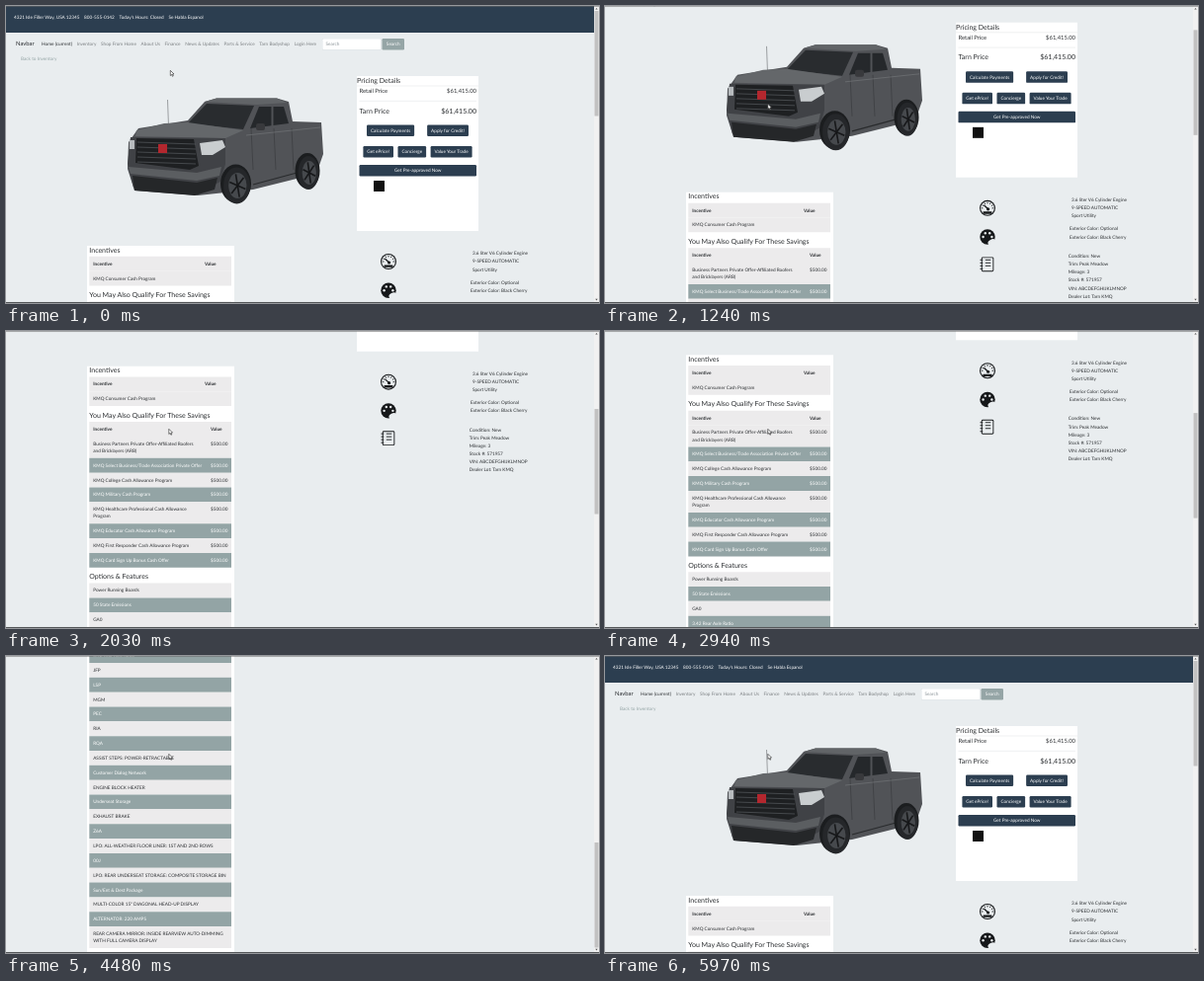
These frames come from a looping animation (600 px wide and 301 px high, 6 s). An HTML page with a canvas:

```html
<!DOCTYPE html>
<html lang="en">
<head>
<meta charset="utf-8">
<title>Vehicle page scroll</title>
<style>
html, body { margin: 0; width: 100%; height: 100%; overflow: hidden; background: #e9edef; }
canvas { display: block; width: 600px; height: 301px; }
</style>
</head>
<body>
<canvas id="stage" width="600" height="301"></canvas>
<script>
const ctx = document.getElementById('stage').getContext('2d');
ctx.textRendering = 'geometricPrecision';

const LOOP = 6000, W = 600, H = 301;
const NOTCH = 31.25, END = 515.3;
const BG = '#e9edef', NAVY = '#2c3e50', SLATE = '#93a4a5', INK = '#2b2e31', PALE = '#ecebec', DARK = '#16181a';
const BODY = 4.69, H5 = 5.86, H4 = 7.03, ROW = 14.84, LEADING = 7.1;

// Wheel travel: [time, notches scrolled]
const SCROLL = [
  [0, 0], [400, 0], [610, 1], [970, 1], [1240, 1.73], [1760, 4], [2120, 7], [2940, 7],
  [3270, 12], [3480, 12], [3700, END / NOTCH], [4480, END / NOTCH], [4730, 12], [4880, 12],
  [5150, 2.48], [5480, 0], [LOOP, 0]
];

// Monotone cubic interpolation keeps the holds flat and the moves smooth.
function sample(keys, t) {
  const rate = i => (keys[i + 1][1] - keys[i][1]) / (keys[i + 1][0] - keys[i][0]);
  const tangent = i => {
    if (i === 0 || i === keys.length - 1) return 0;
    const a = rate(i - 1), b = rate(i);
    return a * b <= 0 ? 0 : 2 * a * b / (a + b);
  };
  let i = 0;
  while (i < keys.length - 2 && t >= keys[i + 1][0]) i++;
  const [t0, v0] = keys[i], [t1, v1] = keys[i + 1];
  const d = t1 - t0, u = (t - t0) / d, w = 1 - u;
  return v0 * (1 + 2 * u) * w * w + v1 * u * u * (3 - 2 * u)
    + d * (tangent(i) * u * w * w - tangent(i + 1) * u * u * w);
}

function textWidth(str, size = BODY, weight = 400) {
  ctx.font = `${weight} ${size}px Lato, sans-serif`;
  return ctx.measureText(str).width;
}

function text(str, x, y, size = BODY, color = INK, weight = 400, align = 'left') {
  const width = textWidth(str, size, weight);
  ctx.fillStyle = color;
  ctx.textAlign = align;
  ctx.fillText(str, x, y + size * 0.35);
  return x + width;
}

function textFlow(items, x, y, color) {
  for (const item of items) x = text(item, x, y, BODY, color) + BODY;
}

function textStack(items, x, y, leading, color, weight) {
  items.forEach((item, i) => text(item, x, y + i * leading, BODY, color, weight));
}

function rect(x, y, w, h, color, radius = 0) {
  ctx.fillStyle = color;
  ctx.beginPath();
  ctx.roundRect(x, y, w, h, radius);
  ctx.fill();
}

function trace(points) {
  ctx.beginPath();
  for (let i = 0; i < points.length; i += 2) ctx.lineTo(points[i], points[i + 1]);
}

function poly(color, ...points) {
  ctx.fillStyle = color;
  trace(points);
  ctx.fill();
}

function line(color, width, ...points) {
  ctx.strokeStyle = color;
  ctx.lineWidth = width;
  trace(points);
  ctx.stroke();
}

function oval(x, y, rx, ry, color, tilt = 0) {
  ctx.fillStyle = color;
  ctx.beginPath();
  ctx.ellipse(x, y, rx, ry, tilt, 0, 7);
  ctx.fill();
}

function button(label, x, y, w, color = NAVY) {
  rect(x, y, w, 11.5, color, 1.2);
  text(label, x + w / 2, y + 5.7, BODY, '#fff', 400, 'center');
}

function buttonRow(labels, y, gap) {
  const widths = labels.map(label => textWidth(label) + 7.9);
  let x = 416.5 - (widths.reduce((a, b) => a + b) + gap * (labels.length - 1)) / 2;
  labels.forEach((label, i) => {
    button(label, x, y, widths[i]);
    x += widths[i] + gap;
  });
}

function header() {
  rect(0, 0, W, 27, NAVY);
  textFlow(['4321 Isle Filler Way, USA 12345', '800-555-0142', "Today's Hours: Closed", 'Se Habla Espanol'],
    8, 11.5, '#fff');
  text('Navbar', 10, 38.3, H5);
  const next = text('Home (current)', 36, 38.3) + BODY;
  textFlow(['Inventory', 'Shop From Home', 'About Us', 'Finance', 'News & Updates', 'Parts & Service',
    'Tarn Bodyshop', 'Login Here'], next, 38.3, '#7b7f82');
  rect(320, 33, 59.5, 11.5, '#ced4da', 1.2);
  rect(320.3, 33.3, 58.9, 10.9, '#fff', 1);
  text('Search', 323.5, 38.5, BODY, '#8b9499');
  button('Search', 380.5, 33, 22.5, '#95a5a6');
  text('Back to Inventory', 15, 53, BODY, '#95a5a6');
}

function wheel(x, y, rx, ry) {
  oval(x - 1, y - 2, rx + 2, ry + 1, '#1b1d1f');
  oval(x, y, rx, ry, '#25272a');
  oval(x + 0.8, y, rx * 0.68, ry * 0.7, '#46494d');
  for (let i = 0; i < 6; i++) {
    const a = i * Math.PI / 3 + 0.3;
    line('#17181a', 1.6, x + 0.8, y, x + 0.8 + Math.cos(a) * rx * 0.62, y + Math.sin(a) * ry * 0.64);
  }
}

function truck() {
  line('#66696c', 0.6, 163.5, 95, 164.5, 122);
  // silhouette, roof and glass
  poly('#515357', 124, 138, 134, 124, 184, 116, 201, 97, 213, 93.5, 274, 93.5, 286, 97, 290, 117, 319, 118,
    321, 150, 314, 170, 250, 186, 194, 192, 130, 187, 123, 165);
  poly('#616467', 201, 97, 213, 93.5, 274, 93.5, 284, 98, 254, 100);
  poly('#292c2f', 184, 119, 203, 99, 251, 101, 240, 125);
  poly('#25282b', 247, 124, 256, 102, 281, 102, 286, 119);
  rect(268.5, 101, 2, 22, '#515357');
  rect(253, 119, 9, 7, '#38393c', 2);
  for (const x of [248, 271, 289]) line('#36383b', 0.6, x, 124, x + 2, 166);
  line('#717478', 0.7, 243, 131, 318, 123);
  line('#292b2d', 1.2, 250, 181, 298, 168);
  // bonnet, grille and lamps
  poly('#64676a', 132, 126, 160, 119, 184, 118, 240, 126, 222, 134, 131, 132);
  poly('#404246', 126, 133, 222, 134, 222, 160, 217, 178, 193, 190, 129, 184, 123, 160);
  poly('#1e2022', 132, 134, 190, 135, 195, 162, 186, 166, 131, 159);
  for (let y = 138; y < 162; y += 5) line('#505357', 0.8, 133, y, 192, y + 2);
  poly('#c9cdcf', 196, 139, 219, 136, 222, 143, 209, 151, 198, 151);
  rect(125, 136, 5, 9, '#b7bbbe');
  rect(154, 140, 9, 9, '#b3272e');
  poly('#5b5e61', 124, 163, 193, 169, 218, 163, 216, 172, 193, 177, 126, 170);
  poly('#252729', 128, 172, 193, 179, 214, 174, 211, 186, 191, 192, 130, 187);
  wheel(306, 169, 10.5, 17);
  wheel(233.5, 182, 13.5, 18.5);
}

function pricing() {
  rect(355, 71, 123, 157, '#fff');
  text('Pricing Details', 355, 75.7, H4);
  line('#e4e6e8', 0.6, 355, 81, 478, 81);
  line('#e4e6e8', 0.6, 357.5, 96.3, 476, 96.3);
  [['Retail Price', 85.8, H5], ['Tarn Price', 106.2, H4]].forEach(([label, y, size]) => {
    text(label, 357.5, y, size);
    text('$61,415.00', 476, y, size, INK, 400, 'right');
  });
  buttonRow(['Calculate Payments', 'Apply for Credit!'], 120.5, 13);
  buttonRow(['Get ePrice!', 'Concierge', 'Value Your Trade'], 142, 4.5);
  button('Get Pre-approved Now', 357.5, 161, 118.5);
  rect(372, 177, 11, 11, '#111');
}

function tableRow(y, label, value, dark, weight, valueX = 207) {
  const lines = label.split('|'), h = ROW + (lines.length - 1) * LEADING;
  const color = dark ? '#fff' : INK;
  rect(84.3, y, 143.7, h, dark ? SLATE : PALE);
  textStack(lines, 88.2, y + 7.3, LEADING, color, weight);
  if (value) text(value, valueX, y + 7.3, BODY, color, weight);
  return y + h;
}

function stripedRows(y, labels, value) {
  labels.forEach((label, i) => { y = tableRow(y, label, value, i % 2 === 1); });
}

const OFFERS = [
  'Business Partners Private Offer-Affiliated Roofers|and Bricklayers (ARB)',
  'KMQ Select Business/Trade Association Private Offer', 'KMQ College Cash Allowance Program',
  'KMQ Military Cash Program', 'KMQ Healthcare Professional Cash Allowance|Program',
  'KMQ Educator Cash Allowance Program', 'KMQ First Responder Cash Allowance Program',
  'KMQ Card Sign Up Bonus Cash Offer'
];
const OPTIONS = [
  'Power Running Boards', '50 State Emissions', 'GA0', '3.42 Rear Axle Ratio', 'JFP', 'LSP', 'MGM',
  'PEC', 'RIA', 'RQA', 'ASSIST STEPS: POWER-RETRACTABLE', 'Customer Dialog Network',
  'ENGINE BLOCK HEATER', 'Underseat Storage', 'EXHAUST BRAKE', 'Z6A',
  'LPO: ALL-WEATHER FLOOR LINER: 1ST AND 2ND ROWS', '00J',
  'LPO: REAR UNDERSEAT STORAGE: COMPOSITE STORAGE BIN', 'Sun/Ent & Dest Package',
  'MULTI-COLOR 15" DIAGONAL HEAD-UP DISPLAY', 'ALTERNATOR: 220 AMPS',
  'REAR CAMERA MIRROR: INSIDE REARVIEW AUTO-DIMMING|WITH FULL CAMERA DISPLAY'
];

function details() {
  rect(82, 243, 149, 580, '#fff');
  text('Incentives', 84.3, 247.2, H4);
  const first = tableRow(253.8, 'Incentive', 'Value', false, 700, 201);
  tableRow(first, 'KMQ Consumer Cash Program');
  text('You May Also Qualify For These Savings', 84.3, 292.6, H4);
  stripedRows(tableRow(299.4, 'Incentive', 'Value', false, 700), OFFERS, '$500.00');
  text('Options & Features', 84.3, 456.2, H4);
  stripedRows(462.9, OPTIONS);
}

function gauge(x, y) {
  oval(x, y, 8, 8, DARK);
  oval(x, y, 6.9, 6.9, BG);
  for (let i = 0; i < 7; i++) {
    const a = Math.PI * (1 + i / 6), c = Math.cos(a), s = Math.sin(a);
    line(DARK, 0.9, x + c * 4.6, y + s * 4.6, x + c * 6.2, y + s * 6.2);
  }
  line(DARK, 1.3, x - 3.6, y - 3, x + 0.6, y + 1);
  oval(x + 0.6, y + 1, 1.6, 1.6, DARK);
  rect(x - 4.5, y + 3.4, 9, 2.4, DARK, 0.6);
}

function palette(x, y) {
  oval(x, y, 7.7, 7.7, DARK);
  for (let i = 0; i < 4; i++) {
    const a = Math.PI * (1 + i / 3);
    oval(x + Math.cos(a) * 4.4, y + Math.sin(a) * 4.4, 1.2, 1.2, BG);
  }
  oval(x + 4.2, y + 5.2, 4, 2.6, BG, -0.5);
}

function notebook(x, y) {
  rect(x - 5.5, y - 7.4, 12.5, 14.8, DARK, 1.4);
  rect(x - 4.6, y - 6.5, 10.7, 13, BG, 0.7);
  for (let i = 0; i < 4; i++) {
    const dy = y - 4.5 + i * 3;
    line(DARK, 0.9, x - 6.8, dy, x - 4, dy);
    if (i < 3) line(DARK, 0.9, x - 1.5, dy, x + 4, dy);
  }
}

function specs() {
  gauge(387, 259);
  palette(387, 288.2);
  notebook(386.3, 316);
  textStack(['3.6 liter V6 Cylinder Engine', '9-SPEED AUTOMATIC', 'Sport Utility'], 472, 250.7, 8.12);
  textStack(['Exterior Color: Optional', 'Exterior Color: Black Cherry'], 470, 280, 8.12);
  textStack(['Condition: New', 'Trim: Peak Meadow', 'Mileage: 3', 'Stock #: 571957',
    'VIN: ABCDEFGHIJKLMNOP', 'Dealer Lot: Tarn KMQ'], 468.8, 307.6, 8.12);
}

function scrollbar(scroll) {
  rect(595, 0, 5, H, '#f1f1f1');
  rect(595.5, 5 + scroll / END * 184, 4, 106.5, '#c1c1c1');
  poly('#555', 596.3, 3.6, 597.5, 2, 598.7, 3.6);
  poly('#555', 596.3, 296.8, 597.5, 298.4, 598.7, 296.8);
}

function cursor(t) {
  const u = Math.min(1, Math.max(0, (t - 30) / 320)), e = u * u * (3 - 2 * u);
  ctx.save();
  ctx.translate(166.3 - 1.5 * e, 65.3 + 34 * e);
  const shape = [0, 0, 0, 5.2, 1.2, 4.1, 2.1, 6, 3, 5.6, 2.1, 3.8, 3.7, 3.7];
  poly('#fff', ...shape);
  line('#222', 0.6, ...shape, 0, 0);
  ctx.restore();
}

function draw(t) {
  const scroll = sample(SCROLL, t) * NOTCH;
  rect(0, 0, W, H, BG);
  ctx.save();
  ctx.translate(0, -scroll);
  header();
  truck();
  pricing();
  details();
  specs();
  ctx.restore();
  scrollbar(scroll);
  rect(0, 0, W, 0.5, '#666');
  rect(0, 300, W, 1, '#55585a');
  cursor(t);
}

const start = performance.now();
function tick() {
  draw((performance.now() - start) % LOOP);
  requestAnimationFrame(tick);
}
tick();
</script>
</body>
</html>
```
